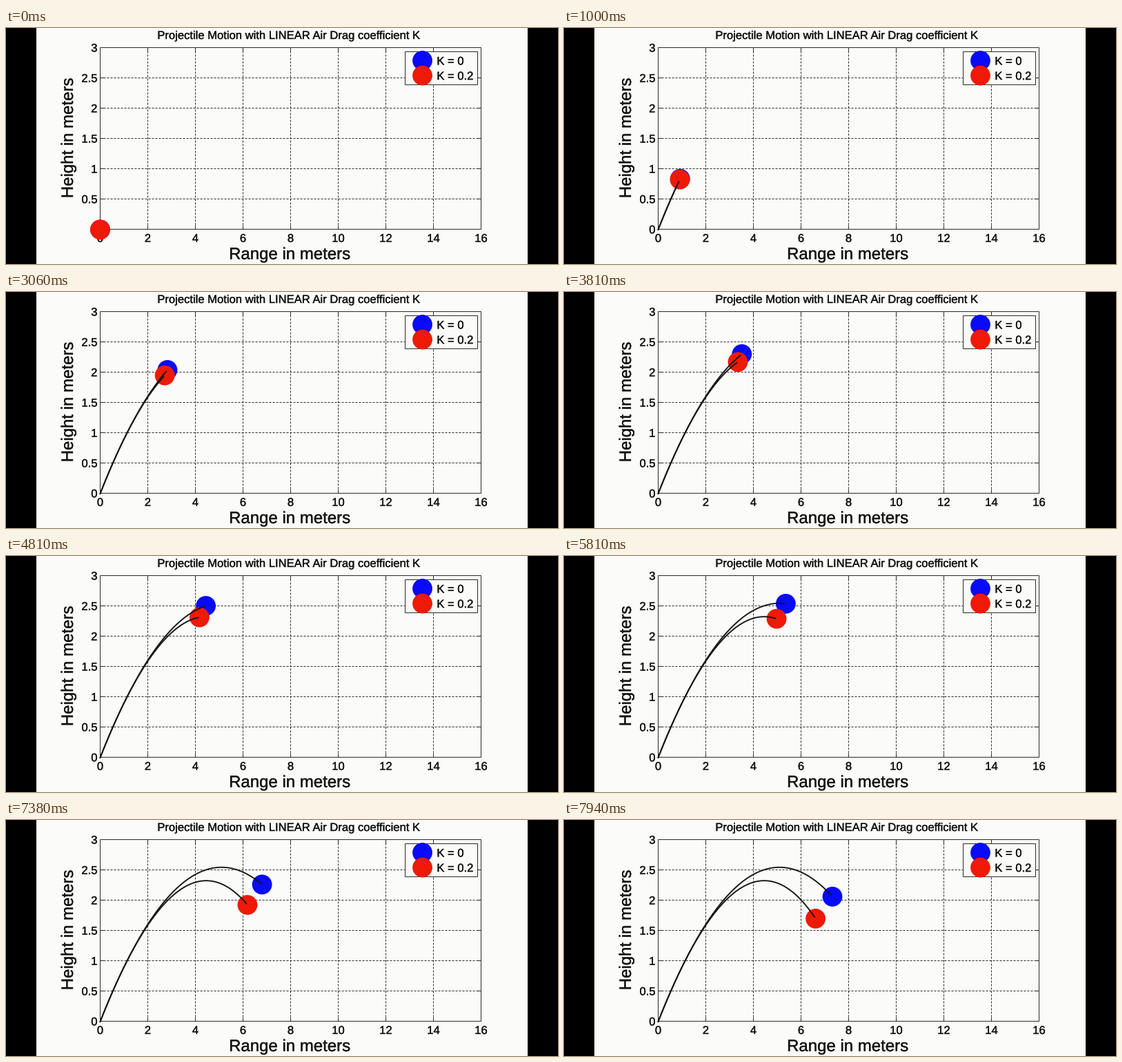
Write a matplotlib script that moves like this. It is 800 by 343 pixels and loops after 8000 ms.

```python
import numpy as np
import matplotlib.pyplot as plt
from matplotlib.animation import FuncAnimation
from matplotlib.patches import Circle, Rectangle
from matplotlib.patheffects import withStroke

plt.rcParams["font.family"] = "Liberation Sans"

W, H, DPI = 800, 343, 100
PAPER, INK, RULE = "#fbfcf9", "#141414", "#2a2a2a"
BLUE, RED = "#080af8", "#ee1a06"
LEFT, RIGHT, TOP, BOTTOM = 136.5, 688.5, 28.5, 292.5
X_MAX, Y_MAX = 16, 3
RADIUS = 14.4

G, V, DRAG = 9.81, 10 / np.sqrt(2), 0.2
FRAME_MS, STEP_MS, FRAMES = 50, 62.5, 160
DT = 0.00815  # flight seconds per step

fig = plt.figure(figsize=(W / DPI, H / DPI), dpi=DPI, facecolor="black")
ax = fig.add_axes([0, 0, 1, 1])
ax.set_xlim(0, W)
ax.set_ylim(H, 0)
ax.axis("off")


def px(size):
    return size * 72 / DPI


def to_x(x):
    return LEFT + x * (RIGHT - LEFT) / X_MAX


def to_y(y):
    return BOTTOM - y * (BOTTOM - TOP) / Y_MAX


def line(xs, ys, z=2, width=1, color=RULE, **kw):
    return ax.plot(xs, ys, color=color, lw=px(width), zorder=z,
                   snap=False, **kw)[0]


def label(x, y, s, size=16.6, ha="center", z=3, **kw):
    bold = [withStroke(linewidth=px(0.35), foreground=INK)]
    ax.text(x, y, s, fontsize=px(size), color=INK, ha=ha, va="baseline",
            zorder=z, path_effects=bold, **kw)


def ball(x, y, color, z):
    return ax.add_patch(Circle((x, y), RADIUS, fc=color, ec="none", zorder=z))


def box(x0, y0, x1, y1, z, **kw):
    ax.add_patch(Rectangle((x0, y0), x1 - x0, y1 - y0, zorder=z,
                           snap=False, **kw))


def draw_axes():
    box(44, 0, 756, H, 0, fc=PAPER, ec="none")
    box(LEFT, TOP, RIGHT, BOTTOM, 2, fc="none", ec=RULE, lw=px(1))
    dots = dict(ls=(0, (3, 2)), dash_capstyle="butt")
    tick = 5
    for v in range(0, X_MAX + 1, 2):
        x = to_x(v)
        label(x, 311, str(v))
        if 0 < v < X_MAX:
            line([x, x], [TOP, BOTTOM], 1, **dots)
            line([x, x], [TOP, TOP + tick])
            line([x, x], [BOTTOM - tick, BOTTOM])
    for v in np.arange(0, Y_MAX + 0.1, 0.5):
        y = to_y(v)
        label(132.5, y + 6, f"{v:g}", ha="right")
        if 0 < v < Y_MAX:
            line([LEFT, RIGHT], [y, y], 1, **dots)
            line([LEFT, LEFT + tick], [y, y])
            line([RIGHT - tick, RIGHT], [y, y])
    label(411, 16, "Projectile Motion with LINEAR Air Drag coefficient K")
    label(411, 336, "Range in meters", 24)
    label(97, 160, "Height in meters", 24, rotation=90,
          rotation_mode="anchor")


def draw_legend():
    box(578.5, 34.5, 683.5, 82.5, 4, fc=PAPER, ec=RULE, lw=px(1))
    rows = [(47.4, BLUE, "K = 0"), (69.1, RED, "K = 0.2")]
    for i, (y, color, text) in enumerate(rows):
        ball(603.5, y, color, 5 + i)
        label(624.3, y + 6, text, ha="left", z=7)


def flight(t, k):
    """Position in pixels after t seconds with linear drag k."""
    if k == 0:
        x, y = V * t, V * t - G * t**2 / 2
    else:
        decay = (1 - np.exp(-k * t)) / k
        x, y = V * decay, (V + G / k) * decay - G * t / k
    return to_x(x), to_y(y) + 0.5


draw_axes()
draw_legend()
shots = []
for i, (k, color) in enumerate([(0, BLUE), (DRAG, RED)]):
    shots.append((k, ball(LEFT, BOTTOM, color, 8 + i),
                  line([], [], 10, 1.9, INK)))


def update(n):
    step = int((n * FRAME_MS + 40) / STEP_MS)
    t = step * DT
    past = np.linspace(0, max(t - DT, 0), 120)
    for k, dot, trail in shots:
        dot.center = flight(t, k)
        if step:
            trail.set_data(*flight(past, k))
        else:
            trail.set_data([], [])
    return [a for shot in shots for a in shot[1:]]


anim = FuncAnimation(fig, update, frames=FRAMES, interval=FRAME_MS,
                     repeat=True, repeat_delay=0)
plt.show()
```
